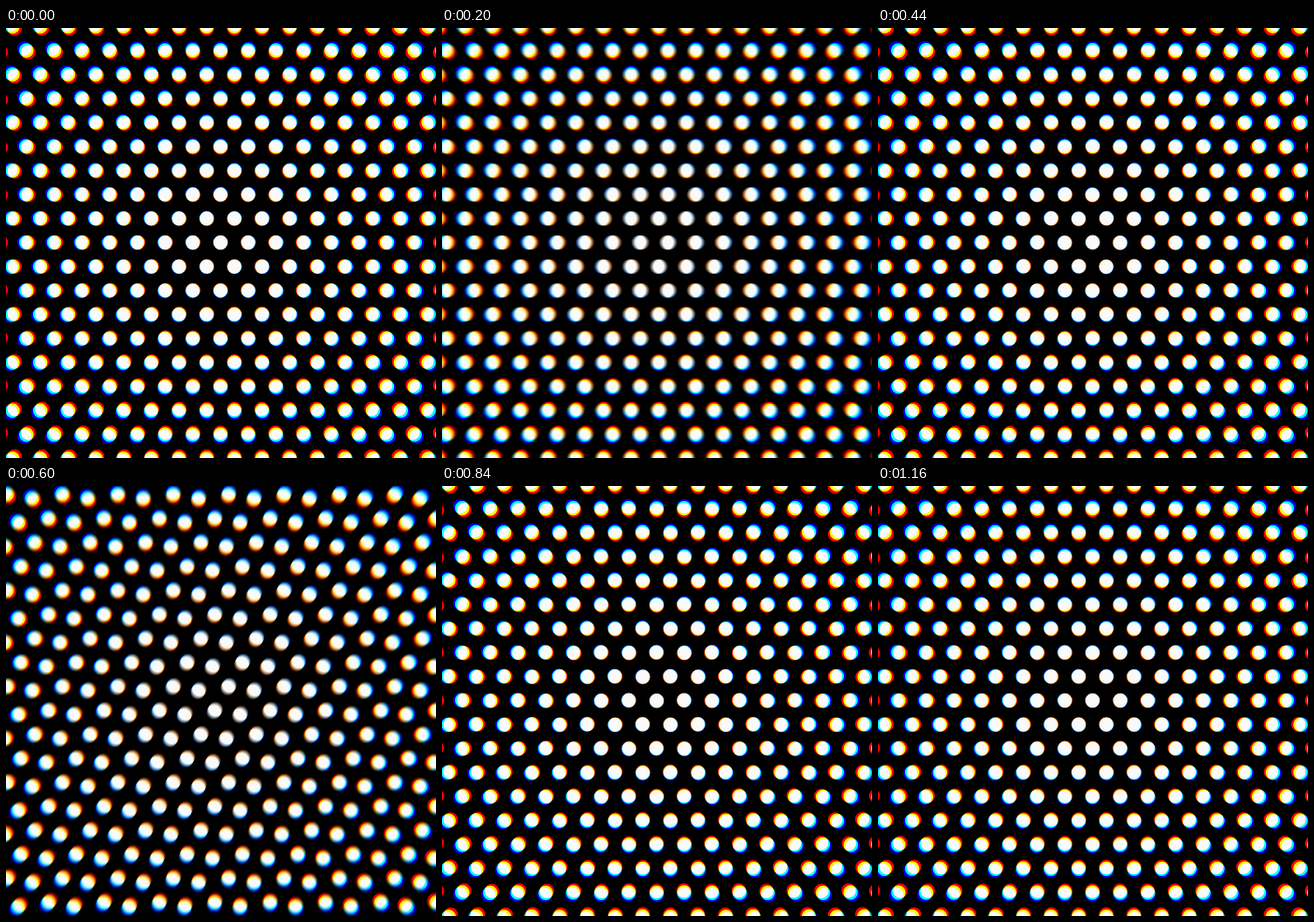
Write an HTML page with a canvas that moves like this. It is 460x460 px and loops after 1200 ms.

```html
<!DOCTYPE html>
<html lang="en">
<head>
<meta charset="utf-8">
<title>Sliding dot lattice</title>
<style>
  html, body { margin: 0; width: 100%; height: 100%; overflow: hidden; background: #000; }
  canvas { display: block; }
</style>
</head>
<body>
<canvas id="stage" width="460" height="460"></canvas>
<script>
const ctx = document.getElementById('stage').getContext('2d');

const SIZE = 460, CENTER = 229.5;
const GAP = 29.67, ROW = GAP * Math.sqrt(3) / 2, RADIUS = 7.75;
const REACH = 13;
const LOOP = 1200, STEP = 40, PHASES = 3;
const SAMPLES = 10, SHUTTER = 0.6;

// Colour fringes: each channel is drawn at its own scale
const LEVEL = Math.round(253 / SAMPLES);
const CHANNELS = [
  { color: `rgb(${LEVEL},0,0)`, scale: 0.99 },
  { color: `rgb(0,${LEVEL},0)`, scale: 1 },
  { color: `rgb(0,0,${LEVEL})`, scale: 1.01 }
];

const ease = p => p < 0.5 ? 4 * p ** 3 : 1 - 4 * (1 - p) ** 3;

// Alternate rows slide one gap in opposite ways; the axis turns 120° per phase
function lattice(time) {
  const u = (time / LOOP % 1) * PHASES;
  const phase = Math.floor(u);
  const slide = ease(u - phase);
  const angle = Math.PI + phase * 2 * Math.PI / 3;
  const c = Math.cos(angle), s = Math.sin(angle);
  const dots = [];
  for (let j = -REACH; j <= REACH; j++) {
    const odd = Math.abs(j) % 2;
    const shift = odd ? 0.5 - slide : slide;
    for (let i = -REACH; i <= REACH; i++) {
      const x = (i + shift) * GAP, y = j * ROW;
      dots.push([x * c - y * s, x * s + y * c]);
    }
  }
  return dots;
}

function drawDots(dots, { color, scale }) {
  ctx.fillStyle = color;
  ctx.beginPath();
  for (const [dx, dy] of dots) {
    const x = CENTER + dx * scale, y = CENTER + dy * scale;
    if (Math.max(Math.abs(x - CENTER), Math.abs(y - CENTER)) > CENTER + 12) continue;
    ctx.moveTo(x + RADIUS, y);
    ctx.arc(x, y, RADIUS, 0, 2 * Math.PI);
  }
  ctx.fill();
}

function draw(time) {
  ctx.globalCompositeOperation = 'source-over';
  ctx.fillStyle = '#000';
  ctx.fillRect(0, 0, SIZE, SIZE);
  ctx.globalCompositeOperation = 'lighter';
  // Motion blur: average several moments within the open shutter
  for (let k = 0; k < SAMPLES; k++) {
    const dots = lattice(time + STEP * SHUTTER * (k + 0.5) / SAMPLES);
    for (const channel of CHANNELS) drawDots(dots, channel);
  }
}

const start = performance.now();
let shown = -1;

function tick() {
  const elapsed = Math.max(0, performance.now() - start) % LOOP;
  const step = Math.floor(elapsed / STEP);
  if (step !== shown) {
    shown = step;
    draw(step * STEP);
  }
  requestAnimationFrame(tick);
}
tick();
</script>
</body>
</html>
```
